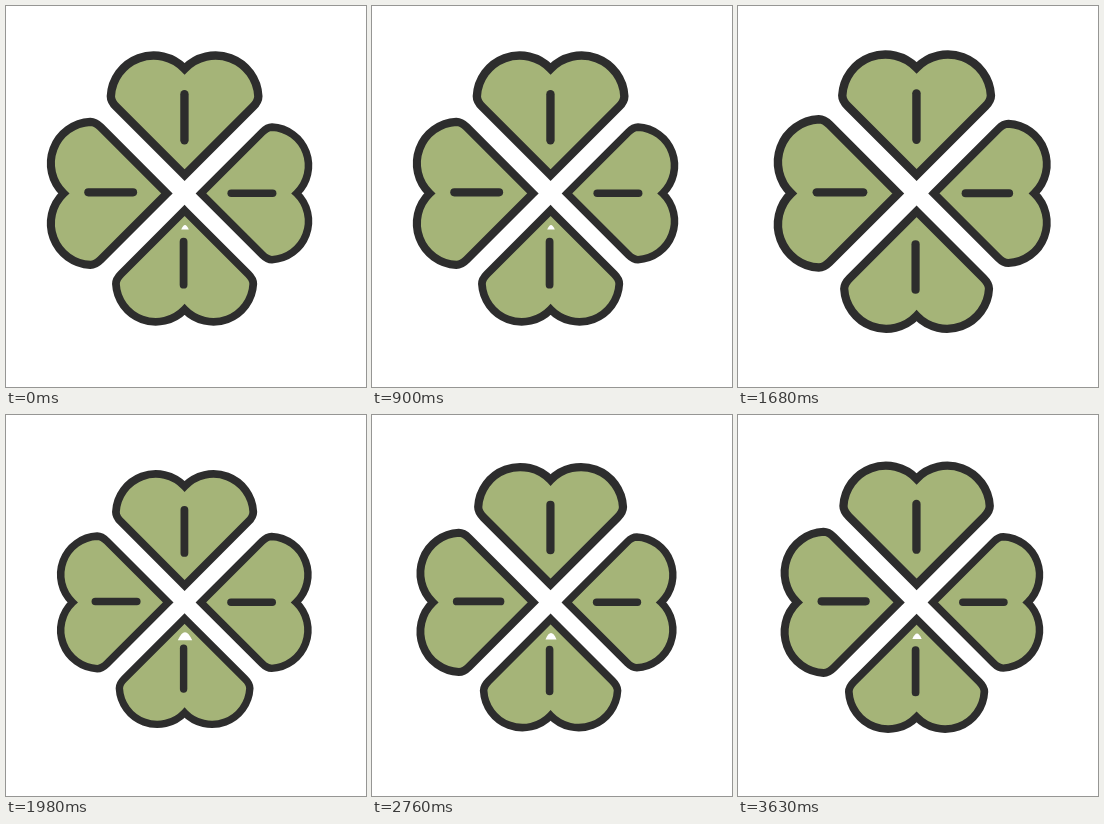
Animation of 360 by 381 pixels, one loop 3.66 s. Source, as an HTML page:

```html
<!DOCTYPE html>
<html lang="en">
<head>
<meta charset="utf-8">
<title>Clover</title>
<style>
  html, body { margin: 0; width: 100%; height: 100%; overflow: hidden; background: #fff; }
  svg { display: block; width: 100vw; height: 100vh; }
  g { fill: #a5b478; stroke: #2d2d2d; stroke-width: 8.4; stroke-linecap: round; stroke-miterlimit: 8; }
</style>
</head>
<body>
<svg viewBox="0 0 360 381">
  <defs>
    <path id="heart" d="M0-18.3 L-68.5-86.8 Q-74-92.3-74-97.5 A43 43 0 0 1 0-125.1 A43 43 0 0 1 74-97.5 Q74-92.3 68.5-86.8 Z"/>
    <path id="vein" d="M.45-99 V-52.7"/>
  </defs>
  <g id="hearts" transform="translate(178.6 187.4)"></g>
  <g id="veins" transform="translate(178 186.8)"></g>
  <path id="glint" fill="#fff"/>
</svg>
<script>
  const LOOP = 3660, PERIOD = 900, STEP = 30;
  // [rotation in degrees, time of largest size in ms]
  const LEAVES = [[0, 818], [90, 548], [180, 638], [270, 728]];
  const $ = id => document.getElementById(id);

  function addUse(group, id) {
    const use = document.createElementNS('http://www.w3.org/2000/svg', 'use');
    use.setAttribute('href', '#' + id);
    $(group).append(use);
    return use;
  }

  const leaves = LEAVES.map(([angle, peak]) => ({
    angle, peak, parts: [addUse('hearts', 'heart'), addUse('veins', 'vein')]
  }));

  const swell = (t, peak) => Math.cos((t - peak) / PERIOD * 2 * Math.PI);

  function draw(t) {
    for (const { angle, peak, parts } of leaves) {
      const scale = 0.944 + 0.0625 * swell(t, peak);
      parts.forEach(p => p.setAttribute('transform', `rotate(${angle}) scale(${scale})`));
    }

    // The glint opens as the bottom leaf shrinks.
    const w = Math.max(0, 2.6 - 4.6 * swell(t, LEAVES[2][1]));
    const base = 221.7 + w * 0.5;
    const top = 220.5 - w * 1.6;
    $('glint').setAttribute('d', w ? `M${179 - w} ${base} Q179 ${top} ${179 + w} ${base} Z` : '');
  }

  const start = performance.now();
  function tick(now) {
    const t = Math.max(0, now - start) % LOOP;
    draw(Math.floor(t / STEP) * STEP);
    requestAnimationFrame(tick);
  }
  draw(0);
  requestAnimationFrame(tick);
</script>
</body>
</html>
```
